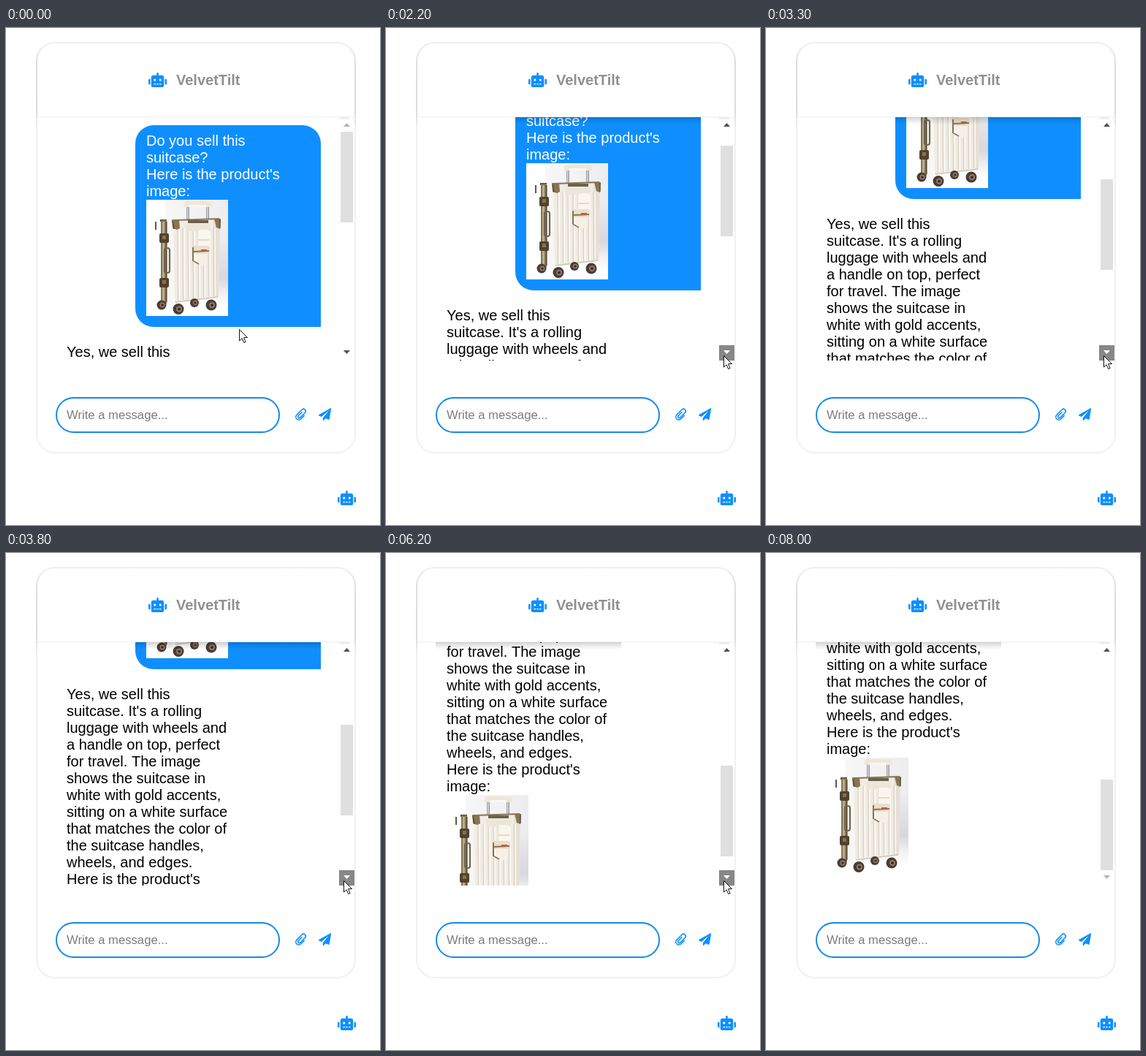
An HTML page with a canvas that plays this animation: 512 px wide and 680 px high, repeating every 8200 ms.

```html
<!DOCTYPE html>
<html lang="en">
<head>
<meta charset="utf-8">
<title>Shop chat</title>
<style>
  html, body { margin: 0; width: 100%; height: 100%; overflow: hidden; background: #fff; }
  canvas { display: block; width: 512px; height: 680px; }
</style>
</head>
<body>
<canvas id="stage"></canvas>
<script>
const LOOP = 8200, STEP = 100;
const BLUE = '#0f8fff';
const FONT = '"Liberation Sans", Arial, sans-serif';
const VIEW = { x: 43, y: 122, w: 434, h: 333 };
const MAX_SCROLL = 451, TRACK = 168;
const CLICKS = [2000, 2300, 2800, 3200, 3600, 4500, 5100, 5700, 6200, 6500];
const CLICK_TIME = 200, CLICK_SCROLL = 50;

const QUESTION = ['Do you sell this', 'suitcase?', "Here is the product's", 'image:'];
const ANSWER = [
  'Yes, we sell this', "suitcase. It's a rolling", 'luggage with wheels and',
  'a handle on top, perfect', 'for travel. The image', 'shows the suitcase in',
  'white with gold accents,', 'sitting on a white surface', 'that matches the color of',
  'the suitcase handles,', 'wheels, and edges.', "Here is the product's", 'image:'
];

const canvas = document.getElementById('stage');
const ctx = canvas.getContext('2d');
const dpr = window.devicePixelRatio || 1;
canvas.width = 512 * dpr;
canvas.height = 680 * dpr;

const clamp = v => Math.max(0, Math.min(1, v));
const ease = v => { v = clamp(v); return v * v * (3 - 2 * v); };
const mix = (a, b, k) => a + (b - a) * k;

function rect(x, y, w, h, color) {
  ctx.fillStyle = color;
  ctx.fillRect(x, y, w, h);
}

function round(x, y, w, h, r, color) {
  ctx.beginPath();
  ctx.roundRect(x, y, w, h, r);
  if (color) { ctx.fillStyle = color; ctx.fill(); }
}

function poly(points, color) {
  ctx.beginPath();
  points.forEach(([x, y]) => ctx.lineTo(x, y));
  ctx.closePath();
  ctx.fillStyle = color;
  ctx.fill();
}

function dot(x, y, r, color) {
  ctx.beginPath();
  ctx.arc(x, y, r, 0, 2 * Math.PI);
  ctx.fillStyle = color;
  ctx.fill();
}

function line(x1, y1, x2, y2, color, width) {
  ctx.beginPath();
  ctx.moveTo(x1, y1);
  ctx.lineTo(x2, y2);
  ctx.strokeStyle = color;
  ctx.lineWidth = width;
  ctx.stroke();
}

function fade(x1, y1, x2, y2, ...stops) {
  const g = ctx.createLinearGradient(x1, y1, x2, y2);
  stops.forEach(([at, color]) => g.addColorStop(at, color));
  return g;
}

function text(str, x, y, color, font) {
  ctx.font = font + ' ' + FONT;
  ctx.fillStyle = color;
  ctx.fillText(str, x, y);
}

function at(x, y, draw) {
  ctx.save();
  ctx.translate(x, y);
  draw();
  ctx.restore();
}

function robot() {
  ctx.scale(20 / 512, 20 / 512);
  round(0, 224, 64, 192, [32, 0, 0, 32], BLUE);
  round(576, 224, 64, 192, [0, 32, 32, 0], BLUE);
  round(288, 0, 64, 120, [32, 32, 0, 0], BLUE);
  round(96, 96, 448, 416, [80, 80, 64, 64], BLUE);
  dot(224, 256, 40, '#fff');
  dot(416, 256, 40, '#fff');
  for (const x of [192, 288, 384]) rect(x, 384, 64, 32, '#fff');
}

function clip() {
  ctx.rotate(Math.PI / 4);
  ctx.beginPath();
  ctx.moveTo(4, -2);
  ctx.lineTo(4, 4.5);
  ctx.arc(0, 4.5, 4, 0, Math.PI);
  ctx.lineTo(-4, -5.5);
  ctx.arc(-1, -5.5, 3, Math.PI, 0);
  ctx.lineTo(2, 3.8);
  ctx.arc(0.2, 3.8, 1.8, 0, Math.PI);
  ctx.lineTo(-1.6, -3);
  ctx.strokeStyle = BLUE;
  ctx.lineWidth = 1.6;
  ctx.lineCap = 'round';
  ctx.stroke();
}

function plane() {
  poly([[16.6, 0], [0, 9.3], [0.3, 10.5], [4, 12], [14, 3.2], [5.8, 13.5],
    [5.8, 16.6], [6.8, 17.2], [9.4, 14.2], [14, 16], [14.7, 15.3], [17.2, 0.4]], BLUE);
}

function wheel(x, y, r) {
  dot(x, y, r, '#493b33');
  dot(x + 1, y, r * 0.55, '#8a7768');
  dot(x + 1, y, r * 0.25, '#30261f');
}

function suitcase() {
  const gold = '#857553', dark = '#51422f', cream = '#f1ece3';
  rect(0, 0, 112, 159, '#fff');
  rect(26, 0, 86, 159, fade(26, 0, 112, 0, [0, '#f8f7f8'], [1, '#edecef']));
  rect(90, 50, 22, 95, fade(0, 50, 0, 145,
    [0, 'rgba(214,212,220,0)'], [0.6, '#d9d7de'], [1, 'rgba(240,240,242,0)']));
  rect(0, 118, 112, 41, fade(0, 118, 0, 159, [0, 'rgba(255,255,255,0)'], [0.75, '#fff']));

  // Pull handle
  for (const x of [55, 82]) {
    rect(x, 7, 4, 33, '#9d9ca3');
    rect(x + 1, 7, 1.5, 33, '#d9d9df');
  }
  round(52, 2, 38, 8, [4, 4, 1, 1], '#eee7d8');
  rect(59, 7, 23, 3, '#f9f7f4');

  // Open lid edge
  rect(12, 30, 2, 11, '#625844');
  rect(19, 27, 9, 3, dark);
  rect(28, 28, 9, 117, '#f8f6f3');
  rect(20, 28, 8, 114, gold);
  rect(22, 30, 3, 110, '#b9ab88');
  rect(27, 30, 1.5, 110, dark);
  round(25, 66, 7, 34, 3);
  ctx.strokeStyle = '#706650';
  ctx.lineWidth = 2.2;
  ctx.stroke();
  for (const y of [46, 107]) {
    round(18, y, 13, 13, 2, dark);
    rect(22, y + 3, 5, 5, '#86714d');
  }

  // Shell with ribs
  poly([[37, 29], [101, 25], [99, 133], [39, 141]], cream);
  poly([[92, 27], [101, 26], [99, 133], [92, 134]], '#e6dfd4');
  for (let x = 43; x < 98; x += 7) {
    line(x, 39, x + 0.5, 138 - (x - 40) / 9, '#d9d0c2', 1.2);
    line(x + 2, 39, x + 2.5, 138 - (x - 40) / 9, '#fcfaf6', 1.5);
  }
  line(40, 140, 98, 133, '#cfc5b5', 1.3);
  line(38, 28, 100, 26, gold, 2);
  poly([[35, 27], [45, 27], [46, 39], [42, 41], [36, 39]], gold);
  poly([[93, 26], [102, 26], [101, 40], [96, 38]], gold);
  line(36, 29, 38, 40, dark, 1.2);
  line(101, 27, 101, 39, dark, 1.2);
  round(54, 33, 34, 10, 2, '#ece6da');
  rect(57, 28, 28, 4, '#6b604a');

  // Cup and holder
  round(71, 41, 15, 31, 3, '#faf5ed');
  rect(71, 54, 15, 2, '#e4d9ca');
  round(63, 63, 24, 11, 3, '#e9dfcc');
  line(64, 65, 64, 84, gold, 2);
  line(65, 71, 86, 70, '#8c7452', 1.8);
  rect(75, 68, 8, 3, '#b4614a');
  round(67, 74, 17, 15, [1, 1, 5, 5], '#f6f0e6');
  line(65, 84, 72, 88, gold, 1.5);

  wheel(21, 144, 6.5);
  wheel(44, 149.5, 7.5);
  wheel(66, 141, 6);
  wheel(89, 144, 7.5);
}

const bubbles = [
  { x: 177, y: 133, h: 276, radii: [25, 25, 0, 25], fill: BLUE, ink: '#fff', lines: QUESTION },
  { x: 68, y: 422, h: 483, radii: [25, 25, 25, 0], fill: '#fff', ink: '#000', lines: ANSWER }
];

function bubble(b, scroll) {
  const y = b.y - scroll;
  round(b.x, y, 254, b.h, b.radii, b.fill);
  b.lines.forEach((s, i) => text(s, b.x + 15, y + 28 + i * 23, b.ink, '20px'));
  at(b.x + 15, y + 10 + b.lines.length * 23, suitcase);
  // Header shadow falls on the bubble
  ctx.save();
  round(b.x, y, 254, b.h, b.radii);
  ctx.clip();
  rect(b.x, 122, 254, 10, fade(0, 122, 0, 132, [0, 'rgba(0,0,0,.16)'], [1, 'rgba(0,0,0,0)']));
  ctx.restore();
}

function arrow(y, dir, color) {
  poly([[462, y - 2.5 * dir], [471, y - 2.5 * dir], [466.5, y + 2.5 * dir]], color);
}

function scrollbar(scroll, hover, pressed) {
  rect(456, 122, 21, 333, '#fff');
  rect(456, 122, 14, 3, '#f1f1f1');
  arrow(132.5, -1, scroll > 0 ? '#505050' : '#b4b4b4');
  rect(458, 142 + Math.round(scroll / MAX_SCROLL * TRACK), 17, 124, '#dfdfdf');
  const end = scroll >= MAX_SCROLL;
  if (pressed && !end) rect(456, 434, 21, 21, '#878787');
  else if (hover && !end) rect(456, 434, 21, 21, '#f0f1f2');
  arrow(443.5, 1, end ? '#b4b4b4' : pressed ? '#fff' : '#505050');
}

function frame() {
  round(42, 20, 436, 561, 25, '#fff');
  ctx.strokeStyle = fade(0, 20, 0, 581,
    [0, '#efefef'], [0.05, '#dedede'], [0.17, '#dcdcdc'], [0.21, '#f1f1f1'], [1, '#f1f1f1']);
  ctx.lineWidth = 2;
  ctx.stroke();
}

function chrome() {
  rect(43, 121, 434, 3, fade(0, 121, 0, 124, [0, 'rgba(0,0,0,.05)'], [1, 'rgba(0,0,0,0)']));
  at(195, 61, robot);
  text('VelvetTilt', 233, 78, '#909090', 'bold 20px');
  round(69, 506, 305, 47, 23.5, '#fff');
  ctx.strokeStyle = '#168ae9';
  ctx.lineWidth = 2;
  ctx.stroke();
  text('Write a message...', 83, 535, '#7b7b7b', '16.67px');
  at(404, 529, clip);
  at(428, 520, plane);
  at(454, 633, robot);
}

function pointer(x, y) {
  at(x + 0.5, y + 0.5, () => {
    poly([[0, 0], [0, 15.5], [3.6, 12.2], [6.2, 18], [8.6, 17], [6, 11.2], [11, 11]], '#fff');
    ctx.strokeStyle = '#111';
    ctx.lineWidth = 1;
    ctx.stroke();
  });
}

function pointerAt(t) {
  const go = ease(t / 1200), leave = ease((t - 6600) / 400);
  return [mix(mix(319, 462, go), 428, leave), mix(mix(412, 448, go), 413, leave)].map(Math.round);
}

function scrollAt(t) {
  const sum = CLICKS.reduce((s, c) => s + CLICK_SCROLL * ease((t - c) / CLICK_TIME), 0);
  return Math.min(MAX_SCROLL, Math.round(sum));
}

function render(t) {
  const scroll = scrollAt(t);
  const [px, py] = pointerAt(t);
  const hover = px >= 456 && py >= 434;
  const pressed = CLICKS.some(c => t >= c && t <= c + CLICK_TIME);

  ctx.setTransform(dpr, 0, 0, dpr, 0, 0);
  rect(0, 0, 512, 680, '#fff');
  frame();
  ctx.save();
  ctx.beginPath();
  ctx.rect(VIEW.x, VIEW.y, VIEW.w, VIEW.h);
  ctx.clip();
  bubbles.forEach(b => bubble(b, scroll));
  scrollbar(scroll, hover, pressed);
  ctx.restore();
  chrome();
  if (t < 7600) pointer(px, py);
}

const start = performance.now();
function tick() {
  const t = (performance.now() - start) % LOOP;
  render(Math.floor(t / STEP) * STEP);
  requestAnimationFrame(tick);
}
tick();
</script>
</body>
</html>
```
